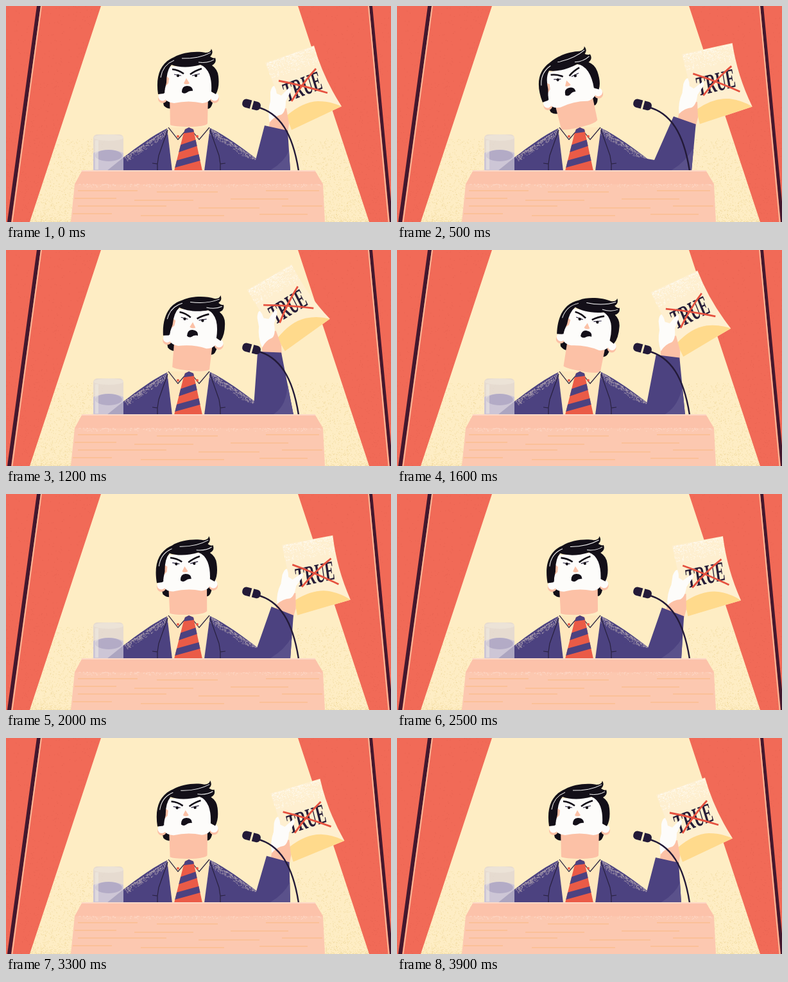
Animation, 600 px wide and 338 px high, one loop 4.2 s. Source, as an HTML page:

```html
<!DOCTYPE html>
<html lang="en">
<head>
<meta charset="utf-8">
<style>
  html, body { margin: 0; width: 100%; height: 100%; overflow: hidden; background: #feedc4; }
  svg { display: block; width: 600px; height: 338px; }
  .ink { fill: #130f18; }
  .suit { fill: #4c4280; }
  .skin { fill: #fcc1a6; }
  .white { fill: #fdfcfa; }
  .line { fill: none; stroke: #29213f; stroke-width: 1.2; }
  .brow { fill: none; stroke: #130f18; stroke-width: 2.6; }
</style>
</head>
<body>
<svg viewBox="0 0 600 338">
  <defs>
    <clipPath id="tieShape"><path d="M279 193L285 190L292 193L294 202L306 258H262L276 202Z"/></clipPath>
  </defs>

  <rect width="600" height="338" fill="#feedc4"/>
  <g id="floor"></g>
  <path fill="#f16a57" d="M0 0H148L37 338H0ZM455 0H600V338H566Z"/>
  <g id="curtain"></g>
  <path fill="#43182e" d="M48 0H54L8 338H2ZM566 0H571L603 338H598Z"/>
  <path fill="none" stroke="#f9b797" stroke-width="2" d="M55 0L9.500 338M565 0L596.500 338"/>

  <path class="suit" d="M157 258L183 237C205 220 228 203 252 191H318C343 203 368 222 394 242L402 258Z"/>
  <g id="shoulders"></g>
  <path fill="#fee7bd" d="M251 190H318L309 258H259Z"/>

  <g id="head">
    <path class="ink" d="M240 130L246 156Q252 162 259 160V130ZM313 135L314 161Q321 161 323 146Z"/>
    <path class="skin" d="M255 140H315L314 184Q310 189 285 189Q262 189 256 186Z"/>
    <circle class="skin" cx="244" cy="145" r="7"/>
    <circle class="skin" cx="325" cy="145" r="7"/>
    <circle class="white" cx="244" cy="142" r="6.5"/>
    <circle class="white" cx="325" cy="142" r="6.5"/>
    <path class="white" d="M249 95L247 140Q247 151 262 152Q285 147 306 152Q320 151 322 138L320 92Z"/>
    <path class="skin" d="M250 110L254 113L253 121L248 126ZM281 113L286 121Q281 124 277 121Z"/>
    <path class="ink" d="M237 138C233 110 240 89 262 80C275 72 298 70 311 73Q319 73 320 67Q324 74 318 79Q324 83 326 81Q329 89 321 93Q330 99 331 110Q333 128 327 138L320 134Q321 118 317 107Q312 95 303 92C286 97 268 96 258 92Q250 101 250 120L246 137Z"/>
    <path fill="none" stroke="#fff" d="M241 112Q244 92 262 85M274 82Q300 83 319 73M300 88Q314 90 324 84"/>
    <path class="brow" d="M259 99Q269 100 277 106M287 107Q295 101 305 98"/>
    <path class="line" d="M262 107L273 109M290 109L302 106"/>
    <circle class="ink" cx="268" cy="109" r="2.2"/>
    <circle class="ink" cx="296" cy="109" r="2.2"/>
    <path class="ink" d="M274 135Q274 125 282 125Q291 125 291 133Q286 132 281 136Q277 138 274 135Z"/>
  </g>

  <path fill="#fee7bd" d="M253 188L268 209L283 193L285 196L300 209L317 188L312 220H258Z"/>
  <path class="line" d="M253 190L268 209L280 195M317 190L301 209L290 195"/>
  <path class="line" d="M252 194L238 234L236 247L228 246M236 247V257M318 194L332 234L334 247L342 246M334 247V257"/>
  <g fill="#ea5b47">
    <circle cx="268" cy="204" r="2"/>
    <circle cx="298" cy="204" r="2"/>
    <g clip-path="url(#tieShape)">
      <path d="M250 185H310V258H250Z"/>
      <path fill="none" stroke="#4c4280" stroke-width="10" d="M270 195L300 191M262 226L306 211M255 250L312 234"/>
    </g>
  </g>

  <g id="hand">
    <path fill="#feefd0" d="M404 89L480 62Q494 112 523 157L445 194Z"/>
    <path fill="#ffda8c" d="M437 172Q462 150 486 149Q506 149 523 157L445 194Z"/>
    <g id="paperGrain"></g>
    <text transform="translate(462 126) rotate(-21) skewX(-4) scale(1 1.95)" y="7.3" text-anchor="middle"
      font-family="'Liberation Serif', serif" font-weight="700" font-size="22" fill="#261d38">TRUE</text>
    <path fill="none" stroke="#e5513f" stroke-width="2.8" d="M425 117Q462 124 501 136M445 149Q462 121 483 98"/>
    <path class="skin" d="M413 165L408 205L438 208L441 184L437 160Z"/>
    <path class="white" d="M411 182Q407 165 412 149L412 135Q414 125 418 125Q421 130 422 137L429 140L441 128Q446 128 443 135L436 149Q436 166 429 170Q419 172 411 182Z"/>
  </g>

  <path id="sleeve" class="suit"/>
  <path id="fold" fill="#5a518b"/>

  <path fill="none" stroke="#231a38" stroke-width="2.4" d="M391 158C427 167 447 200 456 258"/>
  <g transform="rotate(15 382 154.500)">
    <rect x="368" y="147.500" width="29" height="13.500" rx="6" fill="#231a38"/>
    <path fill="#feedc4" d="M381.500 147H384.500V162H381.500Z"/>
  </g>

  <g>
    <rect x="136" y="201" width="47" height="64" rx="6" fill="#e2d9d3" opacity=".85"/>
    <ellipse cx="160" cy="206" rx="23" ry="5" fill="#eee5da" opacity=".8"/>
    <path fill="#cdc6d6" d="M136 230Q160 220 183 230V258H136Z"/>
    <ellipse cx="160" cy="234" rx="21" ry="9" fill="#b3abc6"/>
    <path class="suit" opacity=".25" d="M157 258L183 237V258Z"/>
    <path fill="#f2ede5" opacity=".5" d="M139 210H144V256H139Z"/>
  </g>

  <path fill="#fcc8b0" d="M119 257H481L494 279L497 338H101L107 279Z"/>
  <path fill="#fcc2aa" d="M119 257H481L494 279H107Z"/>
  <path fill="none" stroke="#fdd8c6" stroke-width="2" d="M118 258H482"/>
  <g id="deskGrain"></g>
  <path fill="none" stroke="#f9b068" opacity=".65" d="M112 289H205M235 291H330M405 289H488M107 301H172M200 304H292M350 302H440M112 313H250M300 316H395M430 313H493M104 325H165M210 328H340M395 326H470"/>
</svg>
<script>
const $ = id => document.getElementById(id);

let seed = 7;
const rand = () => (seed = seed * 16807 % 2147483647) / 2147483647;

// Scatters small dots; place() returns the position of one dot.
function grain(id, count, color, opacity, place) {
  let d = '';
  for (let i = 0; i < count; i++) {
    const [x, y] = place();
    d += `M${x.toFixed(1)} ${y.toFixed(1)}h1`;
  }
  $(id).innerHTML += `<path d="${d}" stroke="${color}" opacity="${opacity}"/>`;
}

// Dots on the line from a to b, thinning out along the normal to the given depth.
const along = (ax, ay, bx, by, depth) => () => {
  const k = rand(), off = rand() ** 2 * depth, len = Math.hypot(bx - ax, by - ay);
  return [ax + (bx - ax) * k - (by - ay) / len * off, ay + (by - ay) * k + (bx - ax) / len * off];
};

grain('floor', 900, '#ebd290', .7, () => {
  const y = 338 - rand() ** 1.6 * 130;
  return [148 - 111 * y / 338 + rand() * 75, y];
});
grain('floor', 900, '#ebd290', .7, () => {
  const y = 338 - rand() ** 1.6 * 130;
  return [455 + 111 * y / 338 - rand() * 75, y];
});
grain('curtain', 500, '#dc5c4c', .5, () => {
  const y = rand() * 338;
  return [rand() * (146 - 111 * y / 338), y];
});
grain('curtain', 500, '#dc5c4c', .5, () => {
  const y = rand() * 338, x = 457 + 111 * y / 338;
  return [x + rand() * (600 - x), y];
});
grain('shoulders', 340, '#d9cbc4', .7, along(184, 237, 251, 193, 8));
grain('shoulders', 340, '#d9cbc4', .7, along(320, 193, 392, 241, 8));
grain('paperGrain', 420, '#fffdf6', .9, along(405, 90, 479, 64, 26));
grain('deskGrain', 260, '#fee3d6', .8, along(109, 279, 491, 279, 5));

// time, head (angle, x, y), hand (x, y, angle), elbow x, sleeve base x
const poses = [
  [0, 0, 0, 0, 0, 0, 0, 389, 443],
  [400, -13, -3, 1, 35, -6.5, 7, 401, 459],
  [600, -13, -3, 1, 35, -6.5, 7, 401, 459],
  [900, 4, 3, 0, -26.5, -35.5, -11.5, 386, 448],
  [1100, 5, 4, 0, -25, -39, -11, 386, 448],
  [1600, 10, 5, 1, -5.5, -28.5, -5.5, 389, 449],
  [1700, 10, 5, 1, -5, -28, -5, 389, 449],
  [2000, -1.5, -1, 0, 19.5, -.5, 9, 391, 443],
  [3000, -2, -1.5, 0, 17.5, 2, 8.5, 391, 443],
  [3500, 0, 0, 0, 0, 0, 0, 389, 443],
  [4200, 0, 0, 0, 0, 0, 0, 389, 443]
];

function poseAt(t) {
  const i = poses.findIndex(p => p[0] > t);
  const from = poses[i - 1], to = poses[i];
  const k = (t - from[0]) / (to[0] - from[0]), ease = k * k * (3 - 2 * k);
  return from.map((v, j) => v + (to[j] - v) * ease);
}

const paper = { x: 463.5, y: 125.5 };

function draw(t) {
  const [, tilt, hx, hy, px, py, turn, elbow, base] = poseAt(t);
  $('head').setAttribute('transform', `translate(${hx} ${hy}) rotate(${tilt} 285 175)`);
  $('hand').setAttribute('transform', `translate(${px} ${py}) rotate(${turn} ${paper.x} ${paper.y})`);

  const c = Math.cos(turn * Math.PI / 180), s = Math.sin(turn * Math.PI / 180);
  const carried = (x, y) => {
    const dx = x - paper.x, dy = y - paper.y;
    return [paper.x + px + dx * c - dy * s, paper.y + py + dx * s + dy * c];
  };
  const back = carried(403, 187), front = carried(439, 195);
  $('sleeve').setAttribute('d', `M${back}L${front}L${base} 258H350V232L${elbow} 241Z`);

  const foldX = base + (front[0] - base) * .5, foldY = 258 + (front[1] - 258) * .5;
  $('fold').setAttribute('d', `M${base - 33} 258Q${base - 10} 245 ${foldX} ${foldY}L${base} 258Z`);
}

const STEP = 100, LOOP = 4200;
function tick() {
  draw(Math.floor(performance.now() % LOOP / STEP) * STEP);
  requestAnimationFrame(tick);
}
tick();
</script>
</body>
</html>
```
